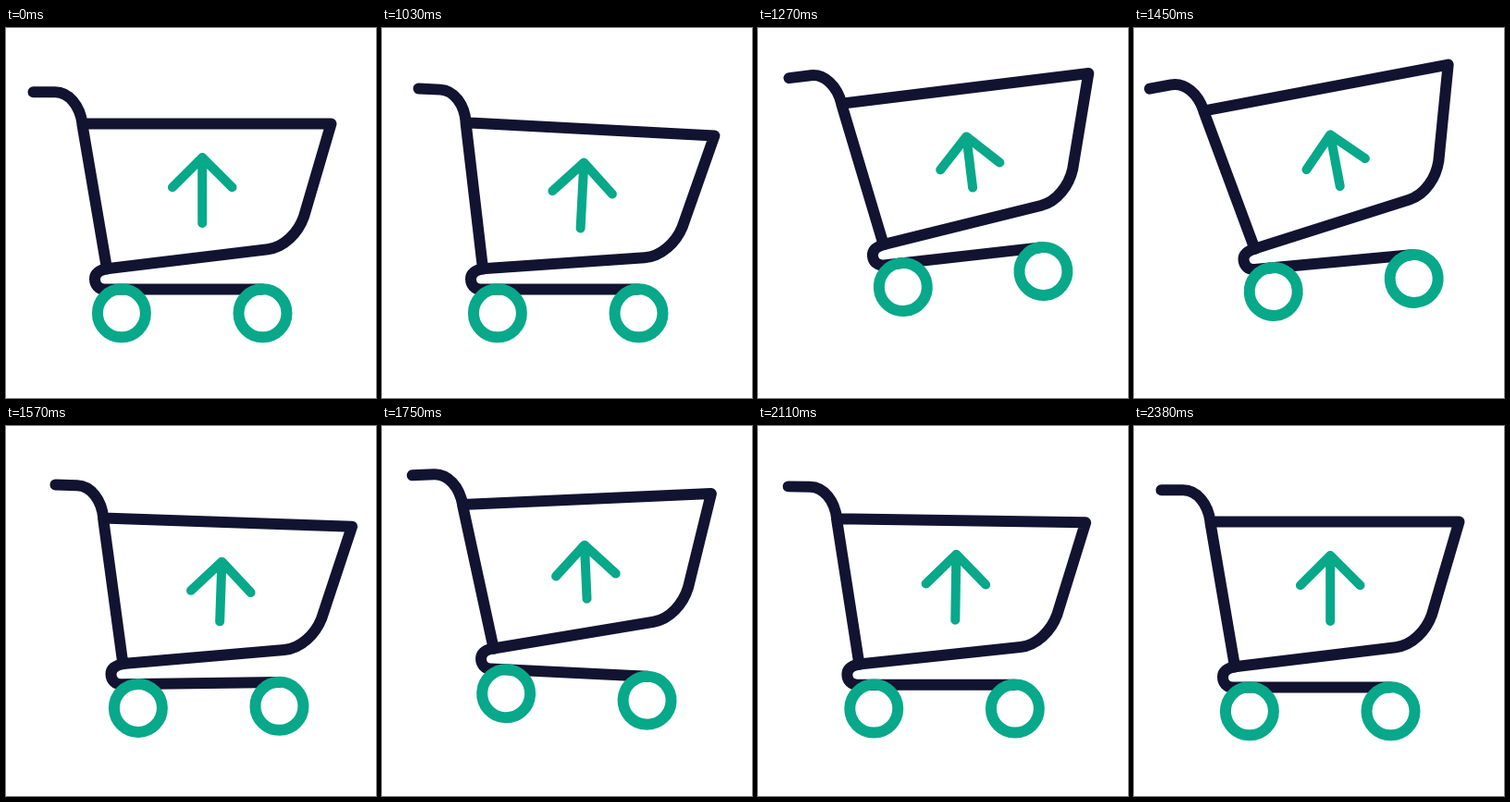
Write an HTML page with a canvas that moves like this. It is 400x400 px and loops after 2.41 s.

```html
<!DOCTYPE html>
<html lang="en">
<head>
<meta charset="utf-8">
<title>Cart</title>
<style>
  html, body { margin: 0; width: 100%; height: 100%; overflow: hidden; background: #fff; }
  canvas { display: block; width: 100vmin; height: 100vmin; }
</style>
</head>
<body>
<canvas id="stage"></canvas>
<script>
const LOOP = 2410, START = 1030, STEP = 30;
const NAVY = '#121331', GREEN = '#08a88a';
const PIVOT = { x: 109, y: 260 };
const AXLE = { x: 201.2, y: 308.3 };
const WHEEL_OFFSET = 76.3;

const BASE = 'M110 260.3C101 261.5 96 265.5 96 271.3C96 278 100.5 282.5 107 282.5H277';
const BASKET = 'M29.5 69.3H53C68 69.3 80 84 82.5 103.5'
  + 'M109 260L82.3 103.5H351.5L322 204C316 221 301 237 283 239.2L109 260.3';

const canvas = document.getElementById('stage');
const ctx = canvas.getContext('2d');

const progress = (t, from, to) => Math.min(1, Math.max(0, (t - from) / (to - from)));
const easeInOut = u => (1 - Math.cos(Math.PI * u)) / 2;

// Parabola that is 0 at both ends and 1 halfway.
function arc(t, from, to) {
  const u = progress(t, from, to);
  return 4 * u * (1 - u);
}

// The cart jumps forward, then rolls back ever more slowly.
function roll(t) {
  const forward = Math.sin(progress(t, START, 1340) * Math.PI / 2);
  return 33.5 * forward * (1 - progress(t, 1340, 2200)) ** 2;
}

// Three hops; the whole cart leans in proportion to its height.
function hop(t) {
  const first = arc(t, 1075, 1585), second = arc(t, 1585, 1950), third = arc(t, 1950, 2200);
  return {
    lift: 39 * first + 15.5 * second + 3 * third,
    tilt: -6.8 * first + 2.8 * second
  };
}

// The basket dips, then swings to and fro, each swing a fixed part of the one before.
const TURNS = [985, 1075, 1390, 1665, 1778, 1978, 2200];
function swing(i) {
  if (i === 0 || i === TURNS.length - 1) return 0;
  return i === 1 ? 6 : -13 * (-0.57) ** (i - 2);
}
function basketTilt(t) {
  const next = TURNS.findIndex(turn => turn > t);
  if (next < 1) return 0;
  const u = easeInOut(progress(t, TURNS[next - 1], TURNS[next]));
  return swing(next - 1) * (1 - u) + swing(next) * u;
}

const arrowLength = t => 71 - 16.5 * arc(t, 1060, 1630) - 13.5 * arc(t, 1630, 1930);

function rotateAbout(p, degrees) {
  ctx.translate(p.x, p.y);
  ctx.rotate(degrees * Math.PI / 180);
  ctx.translate(-p.x, -p.y);
}

function stroke(path, color, width) {
  ctx.strokeStyle = color;
  ctx.lineWidth = width;
  ctx.stroke(new Path2D(path));
}

function drawWheel(x) {
  const wheel = new Path2D();
  wheel.arc(x, AXLE.y, 26, 0, Math.PI * 2);
  stroke(wheel, GREEN, 12);
}

function drawArrow(length) {
  const tip = 211 - length, wing = 32.3;
  stroke(`M212.2 211V${tip}m${-wing} ${wing}l${wing} ${-wing}l${wing} ${wing}`, GREEN, 10);
}

function draw(t) {
  const size = Math.round(canvas.clientWidth * devicePixelRatio);
  if (canvas.width !== size) canvas.width = canvas.height = size;
  ctx.setTransform(size / 400, 0, 0, size / 400, 0, 0);
  ctx.fillStyle = '#fff';
  ctx.fillRect(0, 0, 400, 400);
  ctx.lineCap = ctx.lineJoin = 'round';

  const { lift, tilt } = hop(t);
  ctx.translate(roll(t), -lift);
  rotateAbout(AXLE, tilt);
  stroke(BASE, NAVY, 12);

  ctx.save();
  rotateAbout(PIVOT, basketTilt(t) - tilt);
  stroke(BASKET, NAVY, 12);
  drawArrow(arrowLength(t));
  ctx.restore();

  drawWheel(AXLE.x - WHEEL_OFFSET);
  drawWheel(AXLE.x + WHEEL_OFFSET);
}

function tick() {
  const t = performance.now() % LOOP;
  draw(t < START ? 0 : START + Math.floor((t - START) / STEP) * STEP);
  requestAnimationFrame(tick);
}
tick();
</script>
</body>
</html>
```
